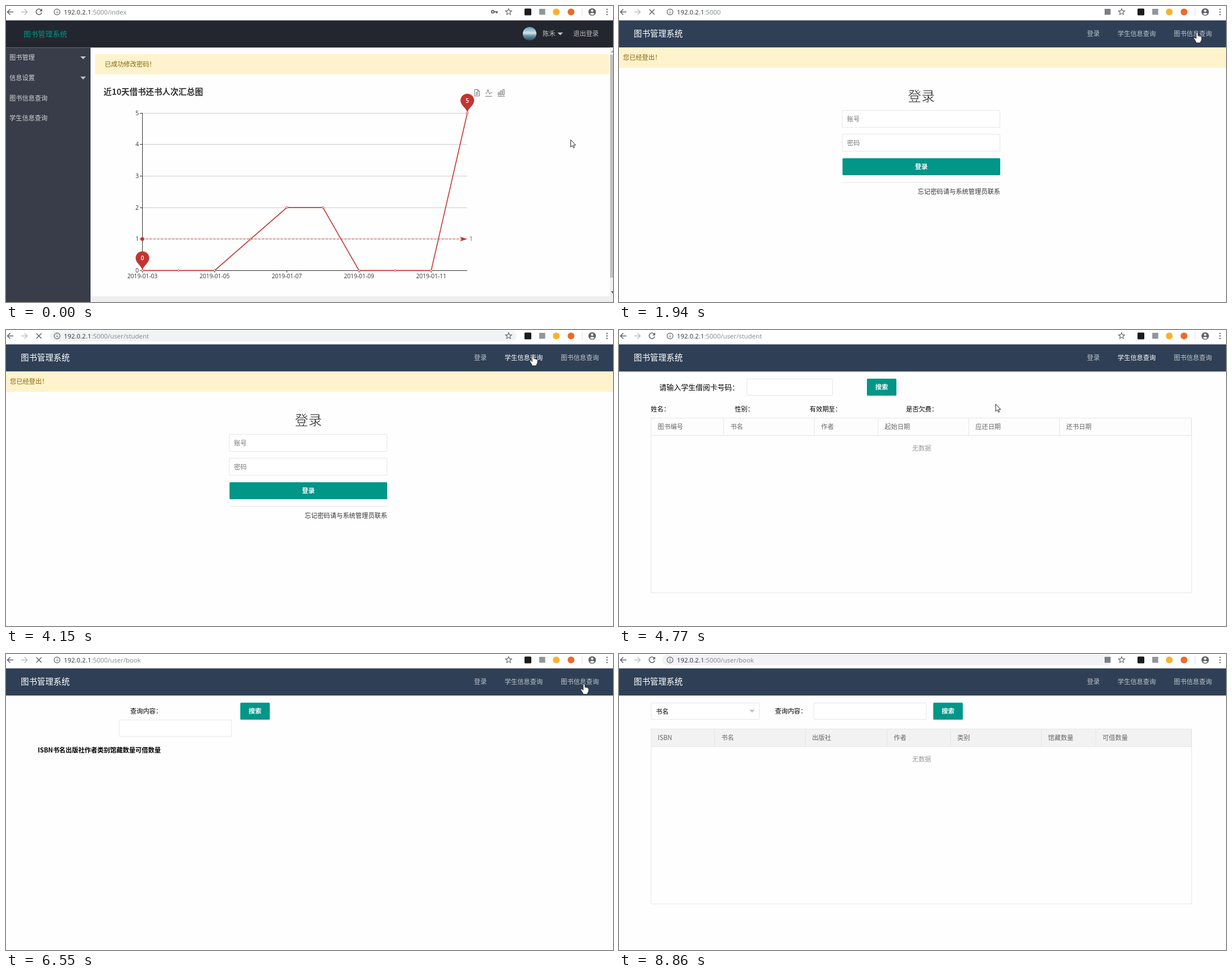
An HTML page for the animation above (9210 ms loop, 1070 by 523 pixels).

```html
<!DOCTYPE html>
<html lang="zh-CN">
<head>
<meta charset="utf-8">
<title>图书管理系统</title>
<style>
html, body { margin: 0; width: 100%; height: 100%; overflow: hidden; background: #fff; }
svg { display: block; width: 1070px; height: 523px; }
text { font-family: "Noto Sans CJK SC", "Noto Sans CJK", "Noto Sans", sans-serif; white-space: pre; }
.latin { font-family: "Open Sans", "Noto Sans", sans-serif; }
.link { fill: #fff; fill-opacity: .7; }
.link.hot { fill-opacity: 1; }
</style>
</head>
<body>
<svg id="stage" viewBox="0 0 1070 523"></svg>
<script>
const LOOP = 9210;
const TEAL = '#009688', RED = '#c23531', LINE = '#e6e6e6', ICON = '#5f6368', PALE = '#c5c6ca', PAGE = '#fefefe';
// page top and bottom edge of the header
const TOP = 25.4, BASE = 73.4;

// ---- drawing helpers ----
const rect = (x, y, w, h, fill, extra = '') =>
  `<rect x="${x}" y="${y}" width="${w}" height="${h}" fill="${fill}" ${extra}/>`;
const circle = (x, y, r, fill, extra = '') =>
  `<circle cx="${x}" cy="${y}" r="${r}" fill="${fill}" ${extra}/>`;
const path = (d, stroke, width = 1, extra = '') =>
  `<path d="${d}" fill="none" stroke="${stroke}" stroke-width="${width}" ${extra}/>`;
const shape = (d, fill, extra = '') => `<path d="${d}" fill="${fill}" ${extra}/>`;
// cy is the vertical centre of the glyphs
const text = (x, cy, str, fill = '#000', size = 11.2, extra = '') =>
  `<text x="${x}" y="${(cy + size * .37).toFixed(2)}" font-size="${size}" fill="${fill}" ${extra}>${str}</text>`;
const link = (x, str, id) => text(x, 49, str, '#fff', 11.2, `class="link" id="${id}"`);
const mid = 'text-anchor="middle"', end = 'text-anchor="end"';
const during = (ranges, ...parts) => `<g data-on="${ranges}">${parts.join('')}</g>`;
const box = (x, y, w, h) => rect(x + .5, y + .5, w - 1, h - 1, '#fff', `rx="1.5" stroke="${LINE}"`);
const button = (x, y, w, h, str) =>
  rect(x, y, w, h, TEAL, 'rx="1.6"') + text(x + w / 2, y + h / 2, str, '#fff', 11.2, mid + ' font-weight="700"');
const caret = (x, y, fill, w = 5) => shape(`M${x - w} ${y - 2.5}h${2 * w}l${-w} 5z`, fill);

// ---- browser bar ----
function browser() {
  const urls = [['0-1810', '/index'], ['1810-3970', ''], ['3970-6370', '/user/student'], ['6370-9210', '/user/book']];
  const star = Array.from({ length: 10 }, (_, i) => {
    const a = i * Math.PI / 5, r = i % 2 ? 2.6 : 5.8;
    return (886 + r * Math.sin(a)).toFixed(2) + ' ' + (10.5 - r * Math.cos(a)).toFixed(2);
  }).join('L');
  return [
    rect(0, 0, 1070, TOP, '#fff'),
    during('1750-1940', rect(183, 5.5, 683, 10.5, '#f1f3f4')),
    during('3970-4210', rect(76, 1, 824, 19, '#f1f3f4', 'rx="9.5"')),
    during('6680-9210', shape('M866 1H85.5a9.5 9.5 0 0 0 0 19H866z', '#f1f3f4')),
    path('M13 10.5H2.5M7.5 5.5l-5 5 5 5', ICON, 1.5),
    path('M27 10.5H37.5M32.5 5.5l5 5-5 5', '#babcbe', 1.4),
    during('0-1750,1990-3970,4270-6370,6680-9210',
      path('M62.2 7.3A5 5 0 1 0 63 11.5', ICON, 1.5), shape('M63.8 4.5v5h-5z', ICON)),
    during('1750-1990,3970-4270,6370-6680', path('M53.5 6l9 9M62.5 6l-9 9', ICON, 1.5)),
    circle(90, 10.5, 5.2, 'none', `stroke="${ICON}" stroke-width="1.2"`),
    path('M90 9.7v3.6M90 7.3v1.3', ICON, 1.2),
    ...urls.map(([on, tail]) => during(on, text(102, 10.3,
      `192.0.2.1<tspan fill="#80868b">:5000${tail}</tspan>`, '#303236', 11.4, 'class="latin"'))),
    during('0-1810', circle(858, 10.2, 2.2, 'none', `stroke="${ICON}" stroke-width="1.8"`),
      path('M860.5 10.2H867M865 10v3', ICON, 2)),
    during('1940-3970,6680-9210', rect(856, 5, 10.5, 10.5, '#7b7f84')),
    path(`M${star}Z`, ICON, 1.1),
    rect(914, 4.5, 12, 12, '#1c1c1c', 'rx="1.5"'),
    rect(940, 5, 10.5, 10.5, '#90979c'),
    circle(970, 10.5, 6, '#f9b22d'),
    circle(996, 10.5, 6, '#ed6a29'),
    rect(1015, 4, 1, 13, '#dcdde0'),
    circle(1033.3, 10.5, 6.6, ICON), circle(1033.3, 8.3, 2.1, '#fff'),
    shape('M1029.2 13.8q4.1-3.6 8.2 0-4.1 3.8-8.2 0', '#fff'),
    ...[6, 10.5, 15].map(y => circle(1059.5, y, 1.2, ICON))
  ].join('');
}

// ---- signed-in page with chart ----
function chart() {
  const data = [0, 0, 0, 1, 2, 2, 0, 0, 0, 5];
  const px = i => +(240.5 + i * 63.63).toFixed(1), py = v => +(467.4 - v * 55.66).toFixed(1);
  const pin = (i, v) => `<g transform="translate(${px(i)} ${py(v)})">` +
    shape('M0-1C-2-9-12-13.5-12-22a12 12 0 0 1 24 0C12-13.5 2-9 0-1z', RED) +
    text(0, -22, v, '#fff', 10.2, 'class="latin" font-weight="600" ' + mid) + '</g>';
  const out = [];
  for (let v = 0; v <= 5; v++) {
    const y = Math.round(py(v) - .5) + .5;
    if (v) out.push(path(`M240 ${y}H813`, '#ccc'));
    out.push(path(`M236 ${y}H240`, '#333'));
    out.push(text(234, y - .7, v, '#333', 10.2, 'class="latin" ' + end));
  }
  out.push(path('M240.5 189V467.5H813', '#333'));
  for (let i = 0; i < 10; i += 2) {
    const day = String(3 + i).padStart(2, '0');
    out.push(path(`M${px(i)} 467v4`, '#333'));
    out.push(text(px(i), 477.5, '2019-01-' + day, '#333', 10.2, 'class="latin" ' + mid));
  }
  out.push(path('M' + data.map((v, i) => px(i) + ' ' + py(v)).join('L'), RED, 1.6, 'stroke-linejoin="bevel"'));
  data.forEach((v, i) => out.push(circle(px(i), py(v), 1.7, '#fff', `stroke="${RED}" stroke-width=".9"`)));
  out.push(
    path('M240 411.7H806', RED, .9, 'stroke-dasharray="4 2.6"'),
    circle(240.3, 411.7, 3.3, RED),
    shape('M813 411.7l-13-4.2 3.4 4.2-3.4 4.2z', RED),
    text(817, 411, '1', RED, 10.2, 'class="latin"'),
    pin(0, 0), pin(9, 5),
    path('M826 147.5h5.5l3 3v8.5h-8.5zM831.5 147.5v3h3M828 152.5h4.5M828 154.5h4.5M828 156.5h4.5', '#666', .9),
    path('M845 159.5h12M845 154h2.5l2-6.5 3 8.5 2-3h2.5', '#666', .9),
    path('M867 159.5h12M867.5 157v-4h2.5v4zM871.5 157v-7h2.5v7zM875.8 157v-9.5h2.5v9.5z', '#666', .9)
  );
  return out.join('');
}

function home() {
  const menu = ['图书管理', '信息设置', '图书信息查询', '学生信息查询'];
  return [
    rect(0, TOP, 1070, BASE - TOP, '#23262e'),
    text(31, 49, '图书管理系统', TEAL, 12.8),
    circle(923, 49, 12, 'url(#sky)'),
    text(946, 49, '陈禾', PALE), caret(977, 49.3, PALE, 4.8),
    link(1000, '退出登录', 'logout'),
    `<rect id="bar" x="984" y="69.4" height="4" fill="#5fb878"/>`,
    rect(0, BASE, 149, 450, '#393d49'),
    ...menu.map((m, i) => text(6, 91 + i * 35.7, m, '#d3d4d7')),
    caret(136, 91.5, PALE), caret(136, 127.2, PALE),
    rect(157, 85, 906, 36, '#fff3cd', 'rx="3"'),
    text(174, 103.3, '已成功修改密码！', '#856404'),
    text(172, 152, '近10天借书还书人次汇总图', '#333', 14.4, 'font-weight="700"'),
    chart(),
    rect(1064, BASE, 6, 440, '#f1f1f1'), rect(1065, 86, 5, 394, '#c1c1c1'),
    shape('M1066 82l4-4v4z', '#a3a3a3'), shape('M1066 504h4v4z', '#505050'),
    rect(149, 513, 921, 10, '#eee')
  ].join('');
}

// ---- public pages ----
const topNav = () => [
  rect(0, TOP, 1070, BASE - TOP, '#2f4056'),
  text(26, 49, '图书管理系统', '#fff', 14.4),
  link(825, '登录', 'signin'), link(879, '学生信息查询', 'student'), link(978, '图书信息查询', 'book')
].join('');

// the page-coloured stroke on the heading thins its glyphs
const login = () => [
  rect(0, BASE, 1070, 36, '#fff3cd'),
  text(7, 91.3, '您已经登出！', '#856404'),
  text(533, 159, '登录', '#000', 24, `${mid} font-weight="300" stroke="${PAGE}" stroke-width=".7"`),
  box(393, 184, 279, 31), text(402, 200, '账号', '#757575'),
  box(393, 226, 279, 31), text(402, 242, '密码', '#757575'),
  button(394, 269, 278, 30, '登录'),
  rect(394, 311, 278, 1, LINE),
  text(672, 328, '忘记密码请与系统管理员联系', '#333', 11.2, end)
].join('');

// cols: [left edge, title]
const table = (y, h, head, cols) => [
  rect(56.5, y + .5, 953, h, 'none', `stroke="${LINE}"`),
  rect(57, y + 1, 952, 31, head),
  path(`M56 ${y + 31.5}H1010M1009 ${y}v32`, LINE),
  ...cols.map(([x, str], i) =>
    (i ? path(`M${x + .5} ${y}v32`, LINE) : '') + text(x + 12.3, y + 16, str, '#666')),
  text(533.5, y + 54, '无数据', '#999', 11.2, mid)
].join('');

const studentForm = () => [
  text(71, 101, '请输入学生借阅卡号码：', '#000', 12.8),
  box(225, 86, 152, 30), button(437, 86, 52, 30, '搜索'),
  ...[[56, '姓名：'], [204, '性别：'], [336, '有效期至：'], [506, '是否欠费：']].map(([x, s]) => text(x, 140, s))
].join('');
const studentCols = [[56, '图书编号'], [184, '书名'], [344, '作者'], [456, '起始日期'], [616, '应还日期'], [776, '还书日期']];
const bookCols = [[56, 'ISBN'], [168, '书名'], [328, '出版社'], [472, '作者'], [584, '类别'], [744, '馆藏数量'], [840, '可借数量']];
const rawHead = (y, cols) => text(56, y, cols.map(c => c[1]).join(''), '#000', 11.2, 'font-weight="700"');

const bookForm = () => [
  box(56, 86, 192, 30), text(65, 101.5, '书名'), caret(234.5, 101, '#c2c2c2', 4.8),
  text(275, 101, '查询内容：'), box(343, 86, 199, 30), button(554, 86, 52, 30, '搜索')
].join('');

const stage = document.getElementById('stage');
stage.innerHTML = [
  `<defs><linearGradient id="sky" x2="0" y2="1"><stop stop-color="#5d9db8"/><stop offset=".45" stop-color="#d3e3e8"/>
   <stop offset=".65" stop-color="#6b93a4"/><stop offset="1" stop-color="#26485c"/></linearGradient></defs>`,
  rect(0, 0, 1070, 523, PAGE),
  browser(),
  during('0-1940', home()),
  during('1940-9210', topNav()),
  during('1940-4210', login()),
  during('4210-6550', studentForm()),
  during('4210-4270', rawHead(163, studentCols)),
  during('4270-6550', table(155, 309, '#fdfdfd', studentCols)),
  during('6550-6610', text(219, 101, '查询内容：'), button(413, 86, 52, 30, '搜索'),
    box(199, 116, 199, 30), rawHead(170, bookCols)),
  during('6610-9210', bookForm(), table(132, 309, '#f2f2f2', bookCols)),
  '<g id="mouse">',
  shape('M.5.5V13.2L3.4 10.5 5.3 14.8 7.2 14 5.4 9.8H9.2z', '#fff', 'id="arrow" stroke="#111" stroke-width=".9"'),
  shape('M-1.5 1.2Q0-1 1.5 1.2V6Q3 5 4 6.4 5.5 5.6 6.2 7 8 6.6 8 8.6V13L6.2 16V18H-2V16L-5.4 10.8Q-5.8 8.8-4 8.6L-1.5 10.8z',
    '#fff', 'id="hand" stroke="#111" stroke-width=".7"'),
  '</g>'
].join('');

// ---- motion ----
// from, to, number of steps, then [progress, x, y] points
const moves = [
  [370, 1260, 16, [[0, 995, 236], [.45, 1052, 140], [.75, 1044, 70], [1, 1019, 47]]],
  [2240, 2840, 11, [[0, 1019, 47], [.4, 930, 85], [1, 800, 162]]],
  [3330, 3800, 9, [[0, 800, 162], [.6, 880, 85], [1, 929, 45]]],
  [4480, 5380, 17, [[0, 929, 45], [6 / 17, 663.5, 130.5], [.55, 556, 290], [.68, 575, 383], [.85, 690, 270], [1, 779, 116]]],
  [5430, 6080, 12, [[0, 779, 116], [.5, 905, 82], [1, 1019, 53]]],
  [6910, 7610, 12, [[0, 1019, 53], [.35, 820, 120], [.6, 673, 162], [.8, 800, 130], [1, 943, 80]]],
  [7920, 8800, 14, [[0, 943, 80], [.5, 1000, 230], [1, 1072, 526]]]
];

function along(pts, p) {
  let i = 0;
  while (i < pts.length - 2 && p > pts[i + 1][0]) i++;
  const b = pts[i], c = pts[i + 1], a = pts[i - 1] || b, d = pts[i + 2] || c;
  const u = (p - b[0]) / (c[0] - b[0]);
  const spline = k => b[k] + u * ((c[k] - a[k]) / 2
    + u * (a[k] - 2.5 * b[k] + 2 * c[k] - d[k] / 2 + u * (1.5 * (b[k] - c[k]) + (d[k] - a[k]) / 2)));
  return [spline(1), spline(2)];
}

function mouseAt(t) {
  const [a, b, n, pts] = moves.filter(m => t >= m[0]).pop() || moves[0];
  const step = t < a ? 0 : Math.min(n, Math.floor((t - a) / (b - a) * (n - 1) + 1e-6) + 1);
  return along(pts, step / n);
}

const $ = id => document.getElementById(id);
const timed = [...document.querySelectorAll('[data-on]')].map(el =>
  [el, el.dataset.on.split(',').map(r => r.split('-').map(Number))]);
const links = { logout: [984, 1061], signin: [809, 863], student: [863, 962], book: [962, 1061] };
// a link reacts only once the pointer has moved on the current page
const live = [[370, 1940], [2240, 4210], [4480, 6550], [6910, LOOP]];
const within = (t, [a, b]) => t >= a && t < b;
const show = (el, on) => { el.style.display = on ? '' : 'none'; };

function draw(t) {
  for (const [el, ranges] of timed) show(el, ranges.some(r => within(t, r)));
  const [x, y] = mouseAt(t), isHome = t < 1940, awake = live.some(r => within(t, r));
  let over = false;
  for (const id in links) {
    const hit = (id === 'logout') === isHome && within(y, [TOP, BASE]) && within(x, links[id]);
    const current = id === 'student' && within(t, [4270, 6550]);
    $(id).classList.toggle('hot', hit && awake || current);
    over = over || hit;
  }
  $('bar').setAttribute('width', 76 * Math.min(1, Math.max(0, (t - 1040) / 200)));
  $('mouse').setAttribute('transform', `translate(${x.toFixed(1)} ${y.toFixed(1)})`);
  show($('mouse'), t < 8800);
  show($('hand'), over);
  show($('arrow'), !over);
}

const start = performance.now();
function tick() {
  draw((performance.now() - start) % LOOP);
  requestAnimationFrame(tick);
}
tick();
</script>
</body>
</html>
```
